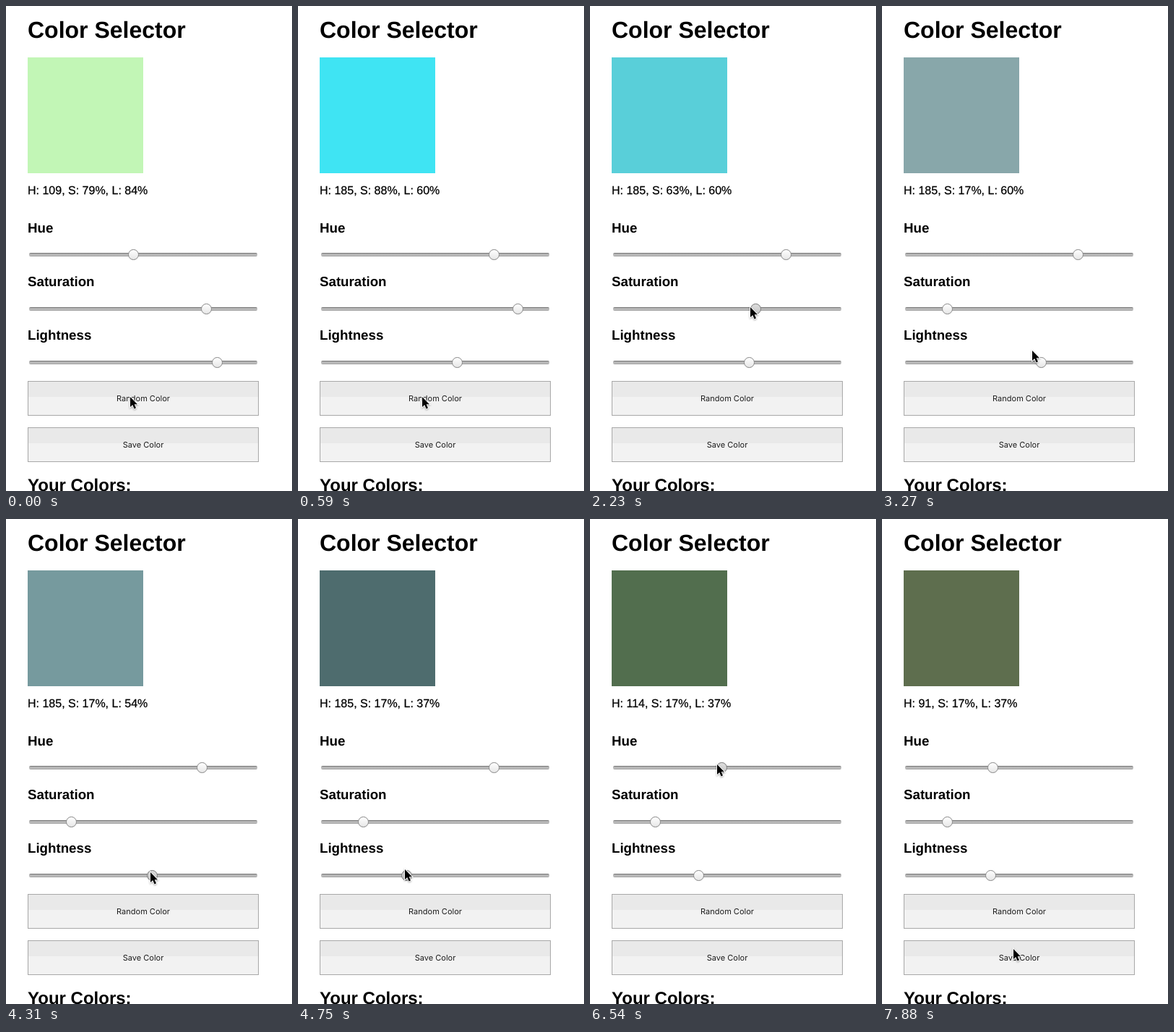
Write an HTML page that moves like this. It is 396 by 670 pixels and loops after 8 s.

```html
<!DOCTYPE html>
<html lang="en">
<head>
<meta charset="utf-8">
<title>Color Selector</title>
<style>
  html, body { margin: 0; width: 100%; height: 100%; overflow: hidden; background: #fff; }
  svg { display: block; font-family: "Liberation Sans", Arial, sans-serif; text-rendering: geometricPrecision; }
  .h1, .h2, .h3 { font-weight: bold; }
  .h1 { font-size: 32px; }
  .h2 { font-size: 24px; }
  .h3 { font-size: 18.72px; }
  #readout { font-size: 16px; stroke: #000; stroke-width: .25px; }
  .label { font: 11px Inter, sans-serif; text-anchor: middle; fill: #1c1c1c; }
  .thumb { fill: url(#knob); stroke: #868686; }
  .thumb.down { fill: url(#knobDown); stroke: #777; }
  .button.down rect { filter: brightness(.88); }
</style>
</head>
<body>
<svg width="396" height="670" viewBox="0 0 396 670">
  <defs>
    <linearGradient id="knob" x2="0" y2="1">
      <stop stop-color="#fff"/><stop offset="1" stop-color="#e6e6e6"/>
    </linearGradient>
    <linearGradient id="knobDown" x2="0" y2="1">
      <stop stop-color="#dedede"/><stop offset="1" stop-color="#c6c6c6"/>
    </linearGradient>
    <linearGradient id="groove" x2="0" y2="1">
      <stop offset=".2" stop-color="#7c7c7c"/><stop offset=".2" stop-color="#acacac"/>
      <stop offset=".8" stop-color="#c2c2c2"/><stop offset=".8" stop-color="#a2a2a2"/>
    </linearGradient>
  </defs>
  <text class="h1" x="30" y="44">Color Selector</text>
  <rect id="swatch" x="30" y="71" width="160" height="160"/>
  <text id="readout" x="30" y="260"></text>
  <g id="controls"></g>
  <text class="h2" x="30" y="670">Your Colors:</text>
  <path id="cursor" d="M0 0V14L3.2 11.1 5.6 16.4 8 15.3 5.7 10.2H10Z" stroke="#fff" stroke-width="1.8"
    paint-order="stroke" style="filter:drop-shadow(0 1px 1px #0005)"/>
</svg>
<script>
const LOOP = 8000, STEP = 148.6;
const $ = id => document.getElementById(id);
const controls = $('controls');

function addSlider(name, y) {
  controls.insertAdjacentHTML('beforeend', `
    <text class="h3" x="30" y="${Math.floor(y - 30.5) - (y > 400)}">${name}</text>
    <rect x="32" y="${y - 2.5}" width="316" height="5" rx="2" fill="url(#groove)"/>
    <circle class="thumb" cy="${y}" r="7"/>`);
  return controls.lastElementChild;
}

function addButton(name, y) {
  controls.insertAdjacentHTML('beforeend', `
    <g class="button">
      <rect x="30.5" y="${y + .5}" width="319" height="47" fill="#f2f2f2" stroke="#a8a8a8"/>
      <rect x="31" y="${y + 1}" width="318" height="21" fill="#e9e9e9"/>
      <text class="label" x="190" y="${y + 28}">${name}</text>
    </g>`);
  return controls.lastElementChild;
}

// Keys are [step, ...values]; values ease smoothly from one key to the next.
function ease(keys, step) {
  const next = keys.findIndex(key => key[0] > step);
  if (next < 0) return keys.at(-1).slice(1);
  const [from, ...a] = keys[next - 1], [to, ...b] = keys[next];
  const u = (step - from) / (to - from), s = u * u * (3 - 2 * u);
  return a.map((v, i) => Math.round(v + (b[i] - v) * s));
}

// A click at step 4 sets all three values; each slider is then dragged once.
const sliders = [
  { thumb: addSlider('Hue', 343.5), max: 240, press: [41, 48],
    keys: [[0, 109], [3, 109], [4, 185], [41, 185], [44, 114], [48, 91]] },
  { thumb: addSlider('Saturation', 418.5), max: 100, press: [13, 18],
    keys: [[0, 79], [3, 79], [4, 88], [13, 88], [18, 17]] },
  { thumb: addSlider('Lightness', 492.5), max: 100, press: [25, 34],
    keys: [[0, 84], [3, 84], [4, 60], [26, 60], [27, 63], [32, 37]] },
];
const randomButton = addButton('Random Color', 518);
addButton('Save Color', 582);

const pointer = [
  [0, 172, 540], [5, 172, 540], [11, 306, 412],
  [13, 295, 414], [18, 88, 419], [19, 88, 419],
  [22, 208, 476], [25, 218, 490], [26, 218, 490], [27, 228, 490], [32, 148, 484], [35, 148, 484],
  [41, 270, 339], [44, 176, 339], [48, 151, 335], [49, 151, 335],
  [53, 182, 594],
];

function draw(now) {
  const step = Math.floor((now % LOOP + 9) / STEP);
  const [h, s, l] = sliders.map(({ thumb, max, press, keys }) => {
    const [value] = ease(keys, step);
    thumb.setAttribute('cx', Math.floor(39.5 + 301 * value / max) + .5);
    thumb.classList.toggle('down', step >= press[0] && step < press[1]);
    return value;
  });
  $('swatch').setAttribute('fill', `hsl(${h}, ${s}%, ${l}%)`);
  $('readout').textContent = `H: ${h}, S: ${s}%, L: ${l}%`;
  randomButton.classList.toggle('down', step === 3);
  $('cursor').setAttribute('transform', `translate(${ease(pointer, step)})`);
}

const start = performance.now();
function tick() {
  draw(performance.now() - start);
  requestAnimationFrame(tick);
}
tick();
</script>
</body>
</html>
```
